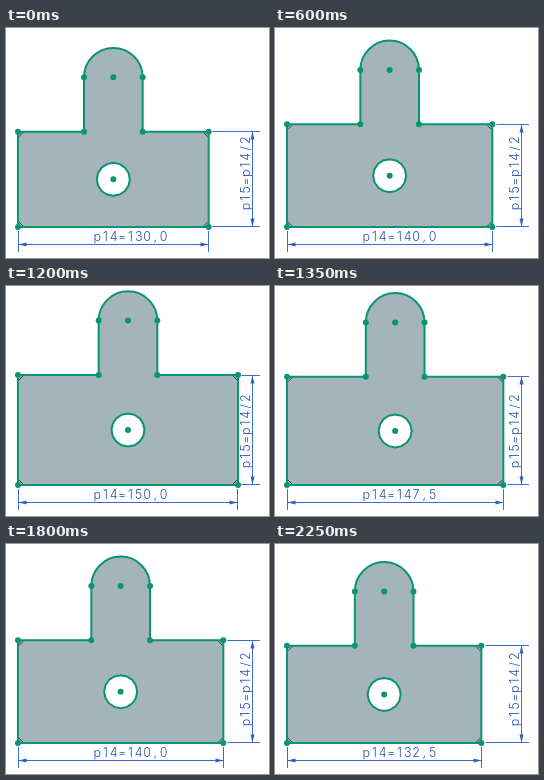
These frames come from a looping animation (263 by 230 pixels, 2400 ms). An HTML page:

```html
<!DOCTYPE html>
<html lang="en">
<head>
<meta charset="utf-8">
<title>Parametric sketch</title>
<style>
  html, body { margin: 0; width: 100%; height: 100%; overflow: hidden; background: #fff; }
  svg { display: block; }
  .edge { stroke: #0a9470; stroke-width: 2; }
  #body { fill: #a3b4ba; }
  #hole { fill: #fff; }
  #dots { fill: #0a9470; }
  #corners { fill: none; stroke: #34464a; }
  #lines { fill: none; stroke: #3a6fd0; }
  #arrows { fill: #2a5fc8; }
  text { font: 300 12.5px Inter, sans-serif; fill: #2450b0; text-anchor: middle; }
</style>
</head>
<body>
<svg width="263" height="230" viewBox="0 0 263 230">
  <path id="body" class="edge"/>
  <path id="hole" class="edge"/>
  <path id="corners"/>
  <path id="dots"/>
  <path id="lines"/>
  <path id="arrows"/>
  <text id="widthLabel" y="213"></text>
  <text id="heightLabel" y="243.5" transform="rotate(-90)"></text>
</svg>
<script>
const SCALE = 22 / 15, LEFT = 12, BOTTOM = 199;
const TOWER = 54.4, RADIUS = 20 * SCALE, HOLE = 16.5;
const STEP = 150, STEPS = 16;
const DIM_X = 246.5, DIM_Y = 216.5;

const el = id => document.getElementById(id);
const draw = (id, d) => el(id).setAttribute('d', d);
const pixel = v => Math.floor(v) + 0.5;

// Fixed-pitch lettering, one character per cell
function label(id, text, start) {
  el(id).textContent = text;
  el(id).setAttribute('x', [...text].map((_, i) => start + i * 8.3).join(' '));
}

const dot = ([x, y]) => `M${x - 3} ${y}a3 3 0 1 1 6 0a3 3 0 1 1 -6 0z`;

function polygon(cx, cy, r, sides) {
  const points = Array.from({ length: sides }, (_, i) => {
    const a = i * 2 * Math.PI / sides;
    return `${cx + r * Math.cos(a)} ${cy + r * Math.sin(a)}`;
  });
  return `M${points.join('L')}z`;
}

function render(p14) {
  const width = p14 * SCALE, height = width / 2;
  const right = LEFT + width, top = BOTTOM - height;
  const cx = LEFT + width / 2, cy = BOTTOM - height / 2;
  const x1 = cx - RADIUS, x2 = cx + RADIUS, shoulder = top - TOWER;

  draw('body', `M${LEFT} ${BOTTOM}V${top}H${x1}V${shoulder}` +
    `A${RADIUS} ${RADIUS} 0 0 1 ${x2} ${shoulder}V${top}H${right}V${BOTTOM}z`);
  draw('hole', polygon(cx, cy, HOLE, 16));

  const corners = [[LEFT, top, 1, 1], [right, top, -1, 1],
    [LEFT, BOTTOM, 1, -1], [right, BOTTOM, -1, -1]];
  draw('corners', corners.map(([x, y, sx, sy]) =>
    `M${x + sx} ${y + 5 * sy}L${x + 5 * sx} ${y + sy}`).join(''));
  draw('dots', [...corners, [x1, top], [x2, top], [x1, shoulder], [x2, shoulder],
    [cx, shoulder], [cx, cy]].map(dot).join(''));

  const l = pixel(LEFT), r = pixel(right), t = pixel(top), b = pixel(BOTTOM - 1);
  draw('lines', `M${l} 203V224M${r} 203V224M${l} ${DIM_Y}H${r}` +
    `M${r + 4} ${t}H254M${r + 4} ${b}H254M${DIM_X} ${t}V${b}`);
  draw('arrows', `M${l} ${DIM_Y}l8 -2v4zM${r} ${DIM_Y}l-8 -2v4z` +
    `M${DIM_X} ${t}l-2 8h4zM${DIM_X} ${b}l-2 -8h4z`);

  label('widthLabel', 'p14=' + p14.toFixed(1).replace('.', ','), 91.2);
}

function tick() {
  const step = Math.floor(performance.now() / STEP) % STEPS;
  render(130 + 2.5 * Math.min(step, STEPS - step));
  requestAnimationFrame(tick);
}

label('heightLabel', 'p15=p14/2', -178.5);
tick();
</script>
</body>
</html>
```
